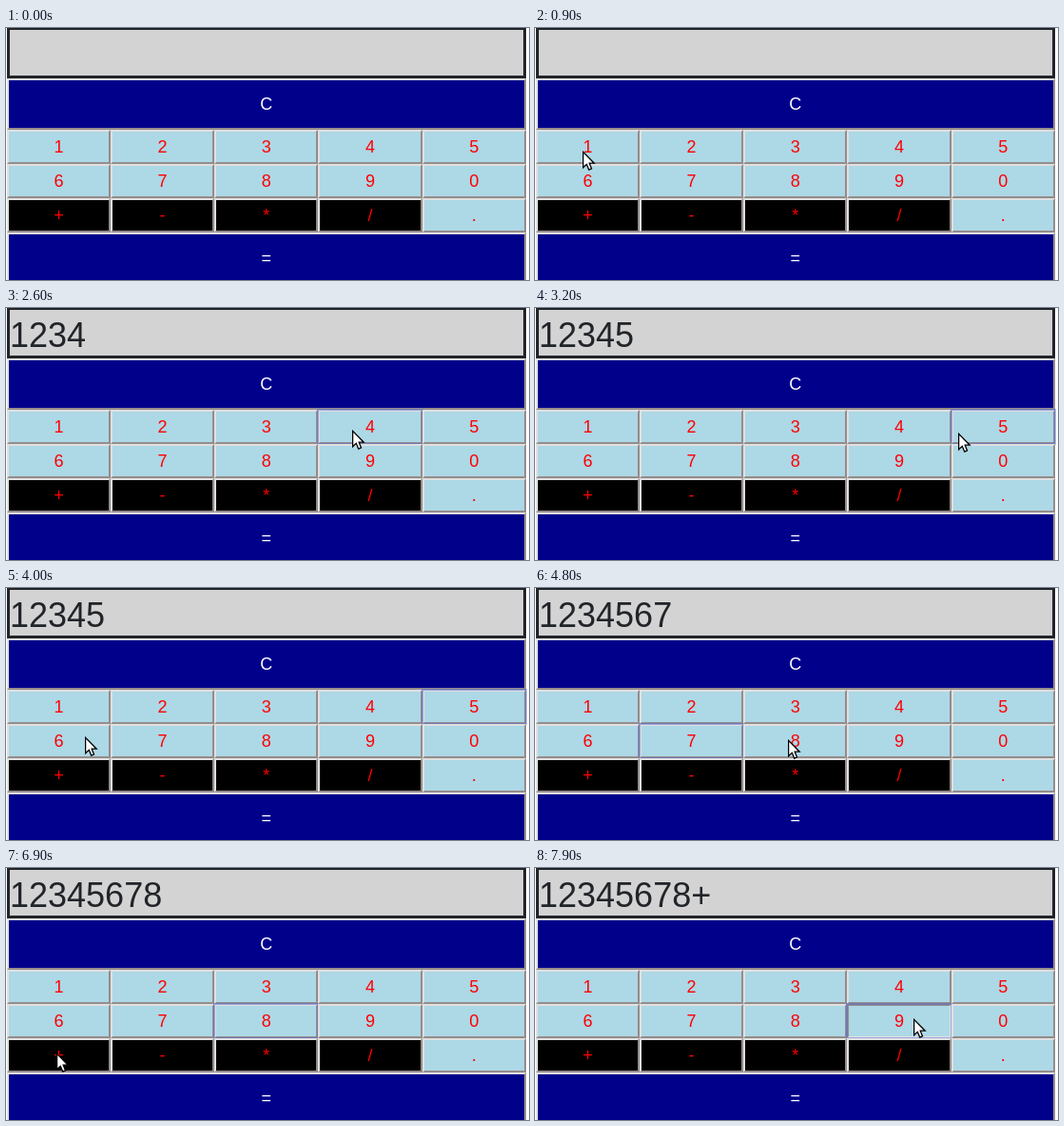
An HTML page for the animation above (8 s loop, 550 by 265 pixels).

```html
<!DOCTYPE html>
<html lang="en">
<head>
<meta charset="utf-8">
<title>Calculator</title>
<style>
html, body { margin: 0; width: 550px; height: 265px; overflow: hidden; background: #fff; }
body { position: relative; font-family: "Liberation Sans", Arial, sans-serif; }
div, svg { position: absolute; box-sizing: border-box; }
#display {
  left: 1px; top: -1px; width: 546px; height: 54px; border: 3px solid #212529;
  background: #d3d3d3; color: #212529; font-size: 36px; line-height: 53px;
}
.key {
  border: 2px solid; border-color: #e0e0e0 #948c8c #948c8c #e0e0e0;
  font-size: 18px; text-align: center; color: red; background: #add8e6;
}
.wide { background: #00008b; color: #fff; }
.op { background: #000; }
.focus { outline: 2px solid rgba(75, 100, 215, .45); outline-offset: -1px; }
.down { border-color: #948c8c #e0e0e0 #e0e0e0 #948c8c; }
#cursor { left: 0; top: 0; z-index: 1; }
</style>
</head>
<body>
<div id="display"></div>
<svg id="cursor" width="14" height="22">
  <path d="M.6 1.4V17.8L4.3 14.3 6.7 20.1 9.5 18.9 7.2 13.2H12.2Z"
    fill="#fff" stroke="#000" stroke-width="1.3"/>
</svg>
<script>
const LOOP = 80; // all times are in ticks of 100 ms
const LEFT = 0.8, WIDTH = 546, COLUMN = WIDTH / 5, ROW = 36, BAR = 54;
const display = document.getElementById('display');
const cursor = document.getElementById('cursor');
const keys = {};

function addKey(label, x, y, w, h, kind) {
  const el = document.createElement('div');
  el.className = 'key ' + kind;
  el.textContent = label;
  el.style.cssText =
    `left:${x}px;top:${y}px;width:${w}px;height:${h}px;line-height:${h - 4}px`;
  document.body.append(el);
  keys[label] = el;
}

addKey('C', LEFT, 53, WIDTH, BAR, 'wide');
[...'1234567890+-*/.'].forEach((label, i) =>
  addKey(label, LEFT + i % 5 * COLUMN, 107 + Math.floor(i / 5) * ROW, COLUMN, ROW,
    '+-*/'.includes(label) ? 'op' : ''));
addKey('=', LEFT, 215, WIDTH, BAR, 'wide');

// Keys in typing order and the tick at which each goes down for one tick.
const typed = '12345678+9';
const presses = [12, 17, 24, 25, 30, 41, 45, 50, 70, 79];

// Pointer moves: tick of departure, tick of arrival, x, y.
const moves = [
  [5, 9, 50, 129], [13, 14, 174, 125], [19, 21, 283, 127], [24, 25, 364, 128],
  [27, 29, 490, 128], [31, 40, 83, 156], [42, 44, 180, 158], [46, 48, 266, 159],
  [51, 53, 373, 181], [53, 58, 353, 157], [58, 59, 240, 159], [60, 62, 387, 195],
  [65, 69, 53, 194], [71, 74, 524, 174], [75, 77, 398, 158]
];

function pointerAt(t) {
  let x = 2, y = 69;
  for (const [from, to, toX, toY] of moves) {
    const k = Math.min(1, Math.max(0, (t - from) / (to - from)));
    x += (toX - x) * k;
    y += (toY - y) * k;
  }
  return [Math.round(x), Math.round(y)];
}

function draw(ms) {
  const t = Math.floor(ms / 100) % LOOP;
  const last = presses.filter(p => p <= t).length - 1;
  display.textContent = typed.slice(0, presses.filter(p => p < t).length);
  for (const key in keys) {
    const focused = key === typed[last];
    keys[key].classList.toggle('focus', focused);
    keys[key].classList.toggle('down', focused && presses[last] === t);
  }
  const [x, y] = pointerAt(t);
  cursor.style.display = t < 6 ? 'none' : 'block';
  cursor.style.transform = `translate(${x}px, ${y}px)`;
}

const start = performance.now();
function tick() {
  draw(performance.now() - start);
  requestAnimationFrame(tick);
}
tick();
</script>
</body>
</html>
```
